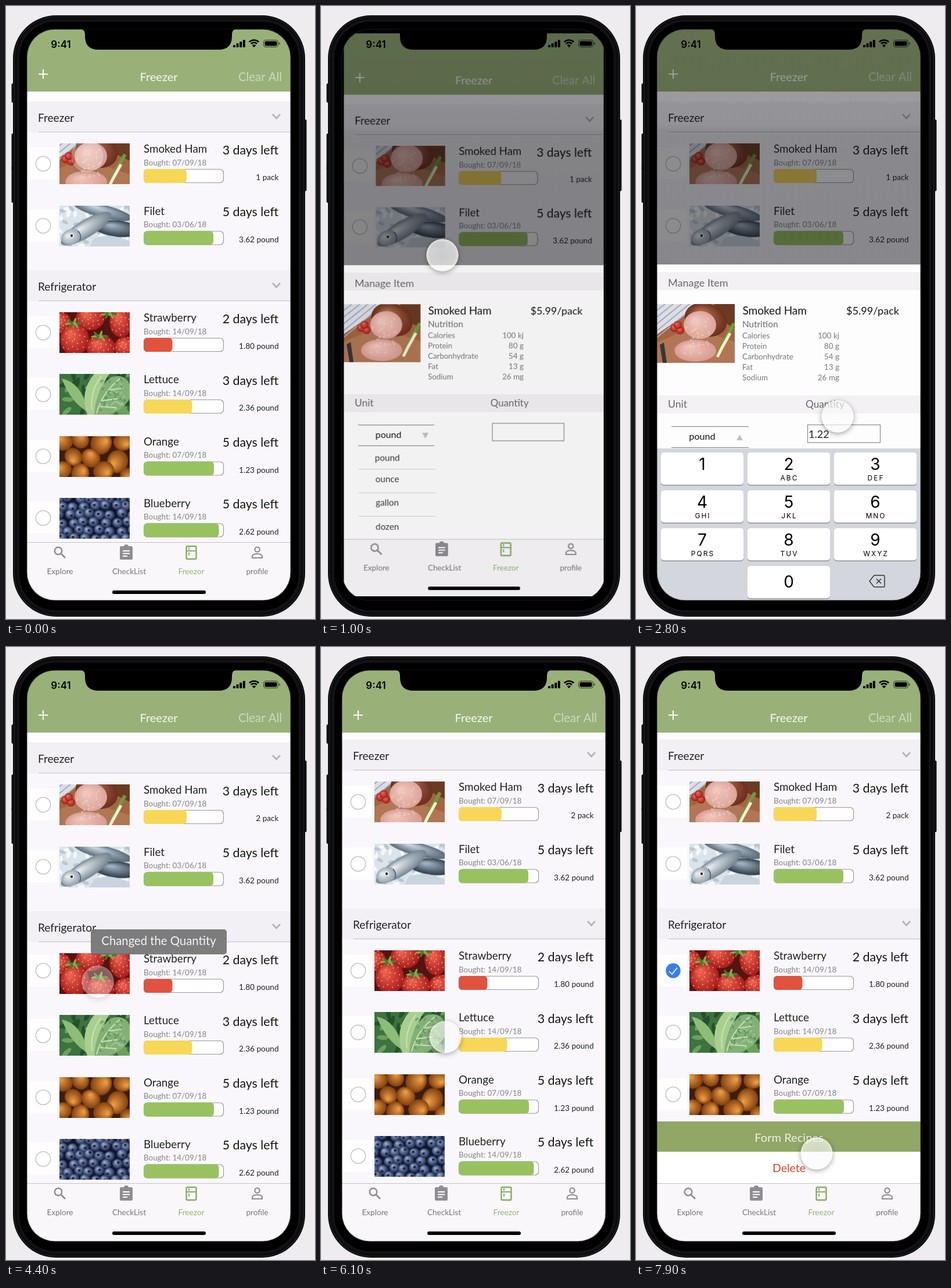
Animation of 532 by 1053 pixels, one loop 8 s. Source, as an HTML page with a canvas:

```html
<!DOCTYPE html>
<html lang="en">
<head>
<meta charset="utf-8">
<title>Freezer list</title>
<style>
html, body { margin: 0; width: 100%; height: 100%; overflow: hidden; background: #eeecef; }
canvas { display: block; }
</style>
</head>
<body>
<canvas id="stage" width="532" height="1053"></canvas>
<script>
const W = 532, H = 1053, LOOP = 8000;
const SCREEN = { x: 36, y: 40, w: 454, h: 981, r: 48 };
const CENTER = { x: 263, y: 530.5 };
const stage = document.getElementById('stage').getContext('2d');
const GREEN = '#99b178', INK = '#222';
let g = stage;

const clamp = v => Math.max(0, Math.min(1, v));
const smooth = (t, from, to) => { const u = clamp((t - from) / (to - from)); return u * u * (3 - 2 * u); };

function canvas(w, h) {
  const c = document.createElement('canvas');
  c.width = w; c.height = h;
  return c;
}
function rect(x, y, w, h, color) { g.fillStyle = color; g.fillRect(x, y, w, h); }
function round(x, y, w, h, r) { g.beginPath(); g.roundRect(x, y, w, h, r); }
function fillRound(x, y, w, h, r, color) { round(x, y, w, h, r); g.fillStyle = color; g.fill(); }
function ellipse(x, y, rx, ry, color, turn = 0) {
  g.beginPath(); g.ellipse(x, y, rx, ry, turn, 0, 7); g.fillStyle = color; g.fill();
}
function line(points, color, width = 1) {
  g.beginPath();
  points.forEach(([x, y]) => g.lineTo(x, y));
  g.strokeStyle = color; g.lineWidth = width; g.stroke();
}
function path(d, color, width) {
  const p = new Path2D(d);
  if (width) { g.strokeStyle = color; g.lineWidth = width; g.stroke(p); }
  else { g.fillStyle = color; g.fill(p); }
}
function text(s, x, y, size, color = INK, align = 'left', weight = 400, family = 'Lato') {
  g.font = `${weight} ${size}px ${family}, sans-serif`;
  g.textAlign = align; g.fillStyle = color; g.fillText(s, x, y);
}
// Runs draw on a new canvas and returns that canvas
function layer(draw, w = W, h = H) {
  const c = canvas(w, h), before = g;
  g = c.getContext('2d');
  draw();
  g = before;
  return c;
}

// Food pictures
let seed = 7;
const random = () => (seed = seed * 16807 % 2147483647) / 2147483647;

function ball(x, y, rx, ry, light, dark, turn = 0) {
  g.save();
  g.translate(x, y); g.rotate(turn); g.scale(rx, ry);
  const shade = g.createRadialGradient(-.3, -.35, .1, 0, 0, 1);
  shade.addColorStop(0, light); shade.addColorStop(1, dark);
  ellipse(0, 0, 1, 1, shade);
  g.restore();
}
function picture(back, draw, w = 121, h = 70) {
  return layer(() => { rect(0, 0, w, h, back); draw(); }, w, h);
}
const ham = picture('#a4643f', () => {
  path('M0 0H75L0 52Z', '#dcdee6');
  for (let i = 0; i < 6; i++) line([[i * 14, 0], [-20, i * 12 + 14]], '#a3a9bb', 2);
  path('M0 66L60 40L150 70V101H0Z', '#b17653');
  path('M98 0H150V48L112 30Z', '#6b3a22');
  ball(84, 27, 37, 28, '#b06a4c', '#6b2e1e', .35);
  ball(74, 36, 28, 24, '#f1c6bc', '#dba59b');
  ball(66, 80, 36, 19, '#f0c2b8', '#d79c92');
  for (let i = 0; i < 26; i++) ellipse(48 + random() * 44, 22 + random() * 68, 3, 1.3, '#f7d6cc88', random() * 3);
  [[30, 41], [40, 45], [36, 36]].forEach(([x, y]) => ball(x, y, 7, 7, '#ee6650', '#9e1c18'));
  line([[133, 33], [120, 56], [105, 88]], '#6e9b3d', 6);
  line([[126, 50], [112, 75], [104, 91]], '#eef0cd', 5);
  path('M5 70L12 66L17 101H10Z', '#39343a');
}, 150, 101);
const hamThumb = picture('#a4643f', () => g.drawImage(ham, -20, -14));
const fish = picture('#dbe4ea', () => {
  for (let i = 0; i < 60; i++) ellipse(random() * 121, random() * 70, 6, 3, i % 2 ? '#f6f8fa' : '#b9c7d3', random() * 3);
  ball(75, 10, 52, 11, '#c3d0db', '#586878', .25);
  ball(100, 40, 40, 14, '#9fb0bf', '#2c3947', .1);
  ball(46, 40, 50, 15, '#e6ecf1', '#74838f', -.55);
  ball(20, 54, 17, 13, '#e6ecf0', '#97a5b0', -.4);
  ellipse(21, 52, 4, 4, '#f0efe6'); ellipse(21, 52, 2.2, 2.2, '#171d23');
  path('M32 44Q39 51 35 60', '#495661', 1.5);
  path('M60 56Q90 46 121 62V70H52Z', '#c9d5de');
});
const strawberry = picture('#541411', () => {
  [[3, 18, 17, 18], [53, 10, 25, 21], [106, 16, 20, 27], [26, 46, 25, 28], [114, 60, 20, 18], [71, 60, 25, 21]]
    .forEach(([x, y, rx, ry]) => {
      ball(x, y, rx, ry, '#f0604f', '#a51c1b');
      for (let i = 0; i < 24; i++) {
        const a = i * 2.4, d = Math.sqrt(i / 26);
        ellipse(x + rx * d * Math.cos(a), y + ry * d * Math.sin(a), .8, 1.2, '#f2b070');
      }
    });
  [[24, 19], [69, 41], [85, 3]].forEach(([x, y]) => {
    for (let i = 0; i < 6; i++) ellipse(x + 8 * Math.cos(i), y + 3 * Math.sin(i), 7, 2, i % 2 ? '#86a94a' : '#4c7930', i);
  });
});
const lettuce = picture('#3c7340', () => {
  for (let i = 0; i < 45; i++) ellipse(random() * 121, random() * 70, 10, 4, i % 2 ? '#6da05c' : '#24522d', random() * 3);
  path('M4 8Q38 14 50 66Q20 50 4 8Z', '#8fbd78');
  path('M48 70Q34 30 60 0H86Q62 32 62 70Z', '#a9cf90');
  path('M60 70Q62 28 88 6Q112 -2 121 18V42Q108 64 84 70Z', '#83b077');
  path('M64 68Q72 34 104 8M56 62Q52 30 72 4M74 46L104 42M70 56L98 58M84 28L110 24', '#cfe3b8', 1.8);
  for (let i = 0; i < 50; i++) ellipse(70 + random() * 44, 8 + random() * 54, 3, 1.5, i % 2 ? '#a9d09b99' : '#4f8c5299', random() * 3);
});
const orange = picture('#3d1d0e', () => {
  [[6, 10, 17], [36, 6, 16], [72, 12, 20], [110, 10, 17], [24, 36, 16], [100, 44, 20], [5, 58, 16], [54, 38, 17], [36, 64, 17], [76, 60, 18], [118, 68, 14]]
    .forEach(([x, y, r], i) => ball(x, y, r, r * .9, '#eb9a42', '#81400f', i));
});
const blueberry = picture('#10162a', () => {
  for (let row = 0; row < 6; row++) for (let col = 0; col < 8; col++) {
    const x = col * 18 + row % 2 * 9 + random() * 6 - 5, y = row * 14 + random() * 5 - 2;
    ball(x, y, 9.2, 8.6, '#93a8d0', '#202c50');
    ellipse(x + random() * 6 - 3, y + random() * 6 - 3, 2.6, 2.1, '#1b2440');
  }
});

// Name, picture, top, bar end, bar colour, days, date, amount
const YELLOW = '#f8d757', FRESH = '#98c25f', RED = '#e0533f';
const rows = [
  ['Smoked Ham', hamThumb, 236, 311, YELLOW, 3, '07/09/18', ''],
  ['Filet', fish, 342.5, 357, FRESH, 5, '03/06/18', '3.62 pound'],
  ['Strawberry', strawberry, 526, 286.5, RED, 2, '14/09/18', '1.80 pound'],
  ['Lettuce', lettuce, 632, 320.5, YELLOW, 3, '14/09/18', '2.36 pound'],
  ['Orange', orange, 738.5, 358, FRESH, 5, '07/09/18', '1.23 pound'],
  ['Blueberry', blueberry, 844.5, 366.5, FRESH, 5, '14/09/18', '2.62 pound']
];

function section(title, y) {
  rect(36, y, 454, 53, '#f2f0f4');
  line([[56, y + 52.5], [490, y + 52.5]], '#bfbdc1');
  text(title, 55, y + 34.5, 19.1);
  line([[459, y + 22], [465.5, y + 29], [472, y + 22]], '#b2b1b5', 2.6);
}
function checkbox(y, on) {
  rect(36, y - 28, 52, 55, '#fefefe');
  g.beginPath(); g.arc(64, y, 12.7, 0, 7);
  g.fillStyle = on ? '#397dec' : '#fff'; g.fill();
  if (on) line([[57, y + 1], [62, y + 6], [71, y - 5]], '#fff', 1.6);
  else { g.strokeStyle = '#bdbcc0'; g.lineWidth = 1.3; g.stroke(); }
}
function foodRow([name, pic, y, end, color, days, date, amount], checkY, on) {
  checkbox(checkY, on);
  g.drawImage(pic, 92, y);
  text(name, 237, y + 16, 18.8);
  text('Bought: ' + date, 237, y + 37.5, 13.4, '#858488');
  text(days + ' days left', 469, y + 18.5, 21.3, '#151515', 'right');
  text(amount, 469.5, y + 63, 13.6, INK, 'right');
  fillRound(237.5, y + 44.5, 137, 23, 6, '#fff');
  g.strokeStyle = '#99989b'; g.lineWidth = 1.2; g.stroke();
  fillRound(237, y + 44, end - 237, 24, 6, color);
}
function tabs() {
  rect(36, 921, 454, 100, '#f9f7fa');
  rect(36, 921, 454, 1, '#c4c2c7');
  const gray = '#8f8d92';
  ellipse(90, 936, 7.5, 7.5, gray); ellipse(90, 936, 5, 5, '#f9f7fa');
  line([[95, 941], [102, 948]], gray, 2.8);
  fillRound(196, 928, 22, 23, 2, gray); ellipse(207, 928, 4, 3, gray);
  [935, 939.5, 944].forEach((y, i) => rect(201, y, i > 1 ? 8 : 12, 2, '#fff'));
  round(310.5, 928, 17, 22, 2); g.strokeStyle = '#87ad61'; g.lineWidth = 2.4; g.stroke();
  line([[310, 936], [328, 936]], '#87ad61', 2);
  line([[315, 930], [315, 934]], '#87ad61', 2); line([[315, 939], [315, 944]], '#87ad61', 2);
  g.beginPath(); g.arc(432.5, 933.5, 4.2, 0, 7); g.strokeStyle = gray; g.lineWidth = 2.2; g.stroke();
  path('M424 948V945Q425 941 432.5 941Q440 941 441 945V948Z', gray, 2.2);
  ['Explore', 'CheckList', 'Freezor', 'profile'].forEach((s, i) =>
    text(s, [93, 212, 319, 432.5][i], 976, 13.6, i === 2 ? '#94b475' : '#77757a', 'center'));
  fillRound(183, 1004, 161, 6, 3, '#000');
}
function list({ amount, shift = 0, changed = false, checked = false }) {
  rect(36, 40, 454, 981, '#f9f7fb');
  rect(36, 147, 454, 17, '#fcfbfd');
  g.save();
  g.translate(0, -shift);
  section('Freezer', 164); section('Refrigerator', 454);
  rows.forEach((row, i) => {
    const data = i ? row : [...row.slice(0, 7), amount];
    const lift = changed && i === 2 ? 5 - shift : 0;
    foodRow(data, row[2] + 35 - lift, checked && i === 2);
  });
  g.restore();
  rect(36, 40, 454, 107, GREEN);
  line([[56, 117], [72, 117]], '#fff', 2); line([[64, 109], [64, 125]], '#fff', 2);
  text('Freezer', 263, 128.5, 20, '#f6f8f2', 'center');
  text('Clear All', 475, 128.5, 20.3, '#ccd9bd', 'right');
}

function sheet(t) {
  list({ amount: '1 pack' });
  const dim = g.createLinearGradient(0, 40, 0, 445);
  dim.addColorStop(0, 'rgba(12,12,16,.39)'); dim.addColorStop(.4, 'rgba(12,12,16,.41)');
  dim.addColorStop(.45, 'rgba(12,12,16,.47)'); dim.addColorStop(1, 'rgba(12,12,16,.48)');
  rect(36, 40, 454, 405, dim);
  rect(36, 444, 454, 577, '#fefdfe');
  rect(36, 457, 454, 31, '#f3f1f4');
  rect(36, 669, 454, 31, '#f3f1f4');
  text('Manage Item', 55, 482, 18.1, '#68676b');
  g.drawImage(ham, 0, 0, 134, 101, 36, 512, 134, 101);
  text('Smoked Ham', 183.5, 530, 19, '#151515');
  text('$5.99/pack', 453, 530, 18.1, '#151515', 'right');
  text('Nutrition', 183, 552, 15.3, '#69686c');
  [['Calories', '100 kj'], ['Protein', '80 g'], ['Carbonhydrate', '54 g'], ['Fat', '13 g'], ['Sodium', '26 mg']]
    .forEach(([label, value], i) => {
      text(label, 183, 571 + i * 18, 13.4, '#79777c');
      text(value, 350, 571 + i * 18, 13.5, '#79777c', 'right');
    });
  text('Unit', 55, 690, 17.6, '#68676b');
  text('Quantity', 292, 690, 17.2, '#68676b');
  const open = t < 1900;
  [722.5, 758.5].forEach(y => line([[61, y], [194, y]], '#777', 1.2));
  text('pound', 114, 745, 16.2, '#151515', 'center');
  path(open ? 'M173 736H184L178.5 746Z' : 'M173 746H184L178.5 736Z', '#c2c1c4');
  g.strokeStyle = '#8c8b8e'; g.lineWidth = 1.2; g.strokeRect(295.5, 719.5, 125, 30.5);
  text('1.22'.slice(0, Math.max(0, (t - 2200) / 100 | 0)), 297, 742, 18);
  ['pound', 'ounce', 'gallon', 'dozen'].forEach((unit, i) => {
    text(unit, 112, [785, 822, 863, 905][i], 15.5, '#3a393c', 'center');
    if (i) line([[62, 758.5 + i * 41], [196, 758.5 + i * 41]], '#d1d0d3');
  });
  tabs();
  const up = smooth(t, 1850, 2300);
  if (up) { g.save(); g.translate(0, 261 * (1 - up)); keypad(); g.restore(); }
}
function keypad() {
  rect(36, 760, 454, 261, '#d3d6dc');
  ['', 'ABC', 'DEF', 'GHI', 'JKL', 'MNO', 'PQRS', 'TUV', 'WXYZ'].forEach((s, i) => key(i + 1, s, i % 3, i / 3 | 0));
  key(0, '', 1, 3);
  path('M402 988L409 979Q410 978 412 978H426Q428 978 428 980V996Q428 998 426 998H412Q410 998 409 997Z', '#333', 1.5);
  path('M414 984L422 992M422 984L414 992', '#333', 1.5);
}
function key(digit, letters, col, row) {
  const x = 43 + col * 149, y = 767 + row * 65;
  fillRound(x, y + 1, 142, 56, 5, '#8b8d92');
  fillRound(x, y, 142, 55.5, 5, '#fff');
  text(digit, x + 71, y + (digit ? 30 : 37), 28, '#000', 'center', 400, 'Inter');
  g.letterSpacing = '2px';
  text(letters, x + 72, y + 48, 12, '#000', 'center', 400, 'Inter');
  g.letterSpacing = '0px';
}

function listBefore() { list({ amount: '1 pack' }); tabs(); }
function listAfter(t) {
  list({ amount: '2 pack', changed: true, shift: 5 * smooth(t, 4600, 4900), checked: t >= 6900 });
  const up = smooth(t, 6900, 7300);
  if (up) {
    g.save();
    g.translate(0, 106 * (1 - up));
    rect(36, 815, 454, 52, '#90a765');
    rect(36, 867, 454, 54, '#fff');
    text('Form Recipes', 263.5, 849.5, 20.1, '#eef2e6', 'center');
    text('Delete', 263.5, 901.5, 19.5, '#d8452f', 'center');
    g.restore();
  }
  tabs();
  const toast = smooth(t, 4150, 4350) * (1 - smooth(t, 4700, 5200));
  if (toast) {
    g.globalAlpha = toast;
    fillRound(146, 485, 234, 43, 5, 'rgba(112,112,113,.9)');
    text('Changed the Quantity', 263, 511.5, 20.3, '#f4f4f4', 'center');
    g.globalAlpha = 1;
  }
}

function zoomed(draw, scale, alpha) {
  const image = layer(draw);
  g.save();
  g.globalAlpha = alpha;
  g.translate(CENTER.x, CENTER.y); g.scale(scale, scale);
  g.beginPath(); g.rect(-SCREEN.w / 2, -SCREEN.h / 2, SCREEN.w, SCREEN.h); g.clip();
  g.drawImage(image, -CENTER.x, -CENTER.y);
  g.restore();
}
function swap(from, to, p) {
  zoomed(from, 1 - p / 2, 1 - p);
  zoomed(to, .5 + p / 2, Math.pow(p, 1.6));
}

function body() {
  rect(0, 0, W, H, '#eeecef');
  [[133, 33], [219, 62], [276, 62]].forEach(([y, h]) => fillRound(9.5, y, 6, h, 2, '#111114'));
  fillRound(511, 195, 6.5, 123, 2, '#111114');
  fillRound(12, 16, 503, 1033, 74, '#0b0b0d');
  round(14.5, 18.5, 498, 1028, 72); g.strokeStyle = '#242528'; g.lineWidth = 1.2; g.stroke();
  fillRound(19, 23, 489, 1019, 66, '#131315');
  fillRound(23, 27, 481, 1011, 62, '#000');
}
function status() {
  path('M130 40Q136 41 136 49V52Q136 75 159 75H366Q389 75 389 52V49Q389 41 395 40Z', '#000');
  text('9:41', 94.5, 71.5, 17, '#000', 'center', 600, 'Inter');
  for (let i = 0; i < 4; i++) fillRound(391 + i * 5.6, 67 - i * 2.9, 4, 4 + i * 2.9, 1, '#000');
  [11.5, 7.2].forEach(r => {
    g.beginPath(); g.arc(427, 70, r, -2.35, -.79); g.strokeStyle = '#000'; g.lineWidth = 2.6; g.stroke();
  });
  path('M427 71L423.7 67.5Q427 65 430.3 67.5Z', '#000');
  round(443.5, 58.5, 25, 12, 3.5); g.strokeStyle = 'rgba(0,0,0,.65)'; g.lineWidth = 1; g.stroke();
  fillRound(445.5, 60.5, 21, 8, 2, '#000');
  fillRound(470, 62.5, 1.6, 4, 1, 'rgba(0,0,0,.65)');
}

// Time, x, y, opacity
const touches = [
  [0, 140, 258, .25], [300, 137, 268, .4], [600, 135, 278, .85], [1000, 209, 428, .85],
  [1700, 352, 728, .85], [1850, 355, 733, .35], [2100, 355, 733, .85], [2600, 353, 726, .85],
  [2800, 347, 705, .85], [3450, 330, 360, .85], [3600, 328, 350, .35], [3800, 320, 365, .8],
  [4300, 165, 567, .5], [4400, 158, 575, .4], [4800, 158, 580, .7], [5400, 170, 600, .75],
  [6100, 214, 670, .75], [6700, 68, 560, .8], [6850, 64, 556, .35], [7100, 68, 562, .8], [7900, 311, 870, .82]
];
function touch(t) {
  const next = Math.max(1, touches.findIndex(k => k[0] >= t));
  const a = touches[next - 1], b = touches[next];
  const u = clamp((t - a[0]) / (b[0] - a[0]));
  const [x, y, alpha] = [1, 2, 3].map(i => a[i] + (b[i] - a[i]) * u);
  const r = 27.5;
  // The shadow only falls outside the translucent disc
  g.save();
  g.globalAlpha = alpha;
  g.beginPath(); g.rect(0, 0, W, H); g.arc(x, y, r, 0, 7); g.clip('evenodd');
  g.shadowColor = 'rgba(0,0,0,.45)'; g.shadowBlur = 9; g.shadowOffsetY = 2;
  ellipse(x, y, r, r, '#fff');
  g.restore();
  const glass = g.createRadialGradient(x, y, 0, x, y, r);
  glass.addColorStop(0, `rgba(250,250,250,${alpha * .72})`);
  glass.addColorStop(.85, `rgba(250,250,250,${alpha * .8})`);
  glass.addColorStop(1, `rgba(250,250,250,${alpha})`);
  ellipse(x, y, r, r, glass);
}

function draw(t) {
  g = stage;
  body();
  g.save();
  round(SCREEN.x, SCREEN.y, SCREEN.w, SCREEN.h, SCREEN.r); g.clip();
  const opening = smooth(t, 372, 1070), closing = smooth(t, 3600, 4250);
  if (opening === 0) listBefore();
  else if (opening < 1) swap(listBefore, () => sheet(t), opening);
  else if (closing === 0) sheet(t);
  else if (closing < 1) swap(() => sheet(t), () => listAfter(t), closing);
  else listAfter(t);
  g.restore();
  round(SCREEN.x, SCREEN.y, SCREEN.w, SCREEN.h, SCREEN.r);
  g.strokeStyle = '#222225'; g.lineWidth = .8; g.stroke();
  status();
  touch(t);
}

const start = performance.now();
function tick() {
  const t = (performance.now() - start) % LOOP;
  draw(Math.floor(t / 100) * 100);
  requestAnimationFrame(tick);
}
tick();
</script>
</body>
</html>
```
